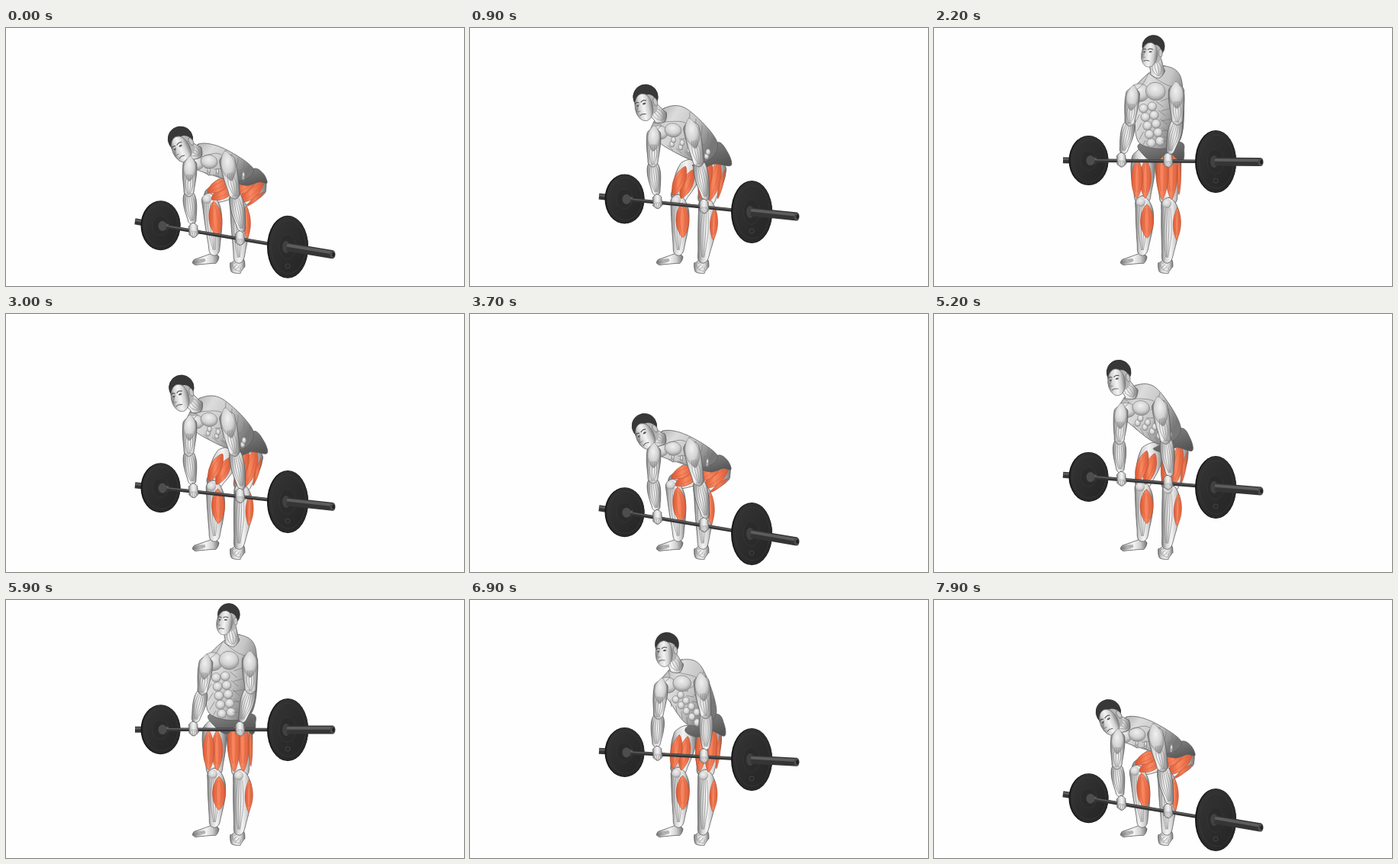
These frames come from a looping animation (600x338 px, 8000 ms). An HTML page:

```html
<!DOCTYPE html>
<html lang="en">
<head>
<meta charset="utf-8">
<title>Barbell deadlift</title>
<style>
  html, body { margin: 0; width: 100%; height: 100%; overflow: hidden; background: #fefefe; }
  svg { display: block; width: 100vw; height: 100vh; }
  path { stroke-linecap: round; stroke-linejoin: round; }
</style>
</head>
<body>
<svg viewBox="0 0 600 338">
  <defs>
    <linearGradient id="skin">
      <stop offset="0" stop-color="#7d7d7d"/><stop offset=".25" stop-color="#d6d6d6"/>
      <stop offset=".5" stop-color="#f4f4f4"/><stop offset=".75" stop-color="#cfcfcf"/>
      <stop offset="1" stop-color="#767676"/>
    </linearGradient>
    <linearGradient id="torso" x2="1" y2=".5">
      <stop offset="0" stop-color="#999"/><stop offset=".35" stop-color="#dcdcdc"/>
      <stop offset=".65" stop-color="#c6c6c6"/><stop offset="1" stop-color="#777"/>
    </linearGradient>
    <radialGradient id="bulge" cx=".45" cy=".35" r=".65">
      <stop offset="0" stop-color="#f0f0f0"/><stop offset=".6" stop-color="#d2d2d2"/>
      <stop offset="1" stop-color="#969696"/>
    </radialGradient>
    <linearGradient id="active">
      <stop offset="0" stop-color="#d9532f"/><stop offset=".45" stop-color="#fa8860"/>
      <stop offset="1" stop-color="#dc5a36"/>
    </linearGradient>
    <linearGradient id="shorts" x2=".6" y2="1">
      <stop offset="0" stop-color="#8a8a8a"/><stop offset="1" stop-color="#555"/>
    </linearGradient>
    <linearGradient id="plate" x2="1" y2="1">
      <stop offset="0" stop-color="#353536"/><stop offset="1" stop-color="#242425"/>
    </linearGradient>
  </defs>
  <g id="scene"></g>
</svg>
<script>
const scene = document.getElementById('scene');
const LOOP = 8000, REP = 4200, STEP = 100;
const MID_Y = 241, LOW_DROP = 48, STAND_RISE = 70;

// Height of the near plate through one repetition: [ms, y]
const LIFT = [[-250, 293], [300, 275], [900, 241], [1200, 195], [1700, 170],
  [1950, 169], [2200, 175], [2700, 209], [3000, 246], [3700, 288]];

// Bent-over and upright position of each joint; the squat is added by rule
const JOINTS = {
  head: [[231, 97], [290, 26]],
  neck: [[251, 118], [296, 56]],
  back: [[284, 106], [327, 67]],
  loin: [[324, 150], [321, 149]],
  seat: [[342, 180], [323, 176]],
  belly: [[304, 176], [268, 150]],
  ribs: [[258, 157], [263, 101]],
  farShoulder: [[241, 136], [262, 80]],
  shoulder: [[289, 128], [319, 76]],
  farHip: [[291, 180], [273, 165]],
  hip: [[321, 178], [306, 162]],
  farKnee: [[272, 224], [273, 226]],
  knee: [[309, 228], [307, 228]]
};

const lerp = (a, b, k) => a + (b - a) * k;
const mix = (a, b, k) => [lerp(a[0], b[0], k), lerp(a[1], b[1], k)];
const shift = (p, dx, dy) => [p[0] + dx, p[1] + dy];
const steps = (count, fn) => Array.from({ length: count + 1 }, (_, i) => fn(i / count));
const n = v => v.toFixed(1);

function liftAt(ms) {
  const key = i => {
    const len = LIFT.length, wrap = Math.floor(i / len), [t, y] = LIFT[i - wrap * len];
    return [t + wrap * REP, y];
  };
  const slope = i => (key(i + 1)[1] - key(i - 1)[1]) / (key(i + 1)[0] - key(i - 1)[0]);
  const t = ms % REP;
  let i = 0;
  while (key(i + 1)[0] <= t) i++;
  const [t0, y0] = key(i), [t1, y1] = key(i + 1);
  const h = t1 - t0, k = (t - t0) / h, r = 1 - k;
  return y0 * r * r * (1 + 2 * k) + y1 * k * k * (3 - 2 * k) + h * k * r * (slope(i) * r - slope(i + 1) * k);
}

function poseAt(y) {
  const squat = Math.max(0, (y - MID_Y) / LOW_DROP), rise = Math.max(0, (MID_Y - y) / STAND_RISE);
  const pose = { squat, rise };
  for (const [name, [bent, upright]] of Object.entries(JOINTS)) {
    const isKnee = /knee/i.test(name), isHip = /hip/i.test(name);
    const drop = isKnee ? -2 : 24 + .4 * (180 - bent[1]);
    pose[name] = shift(mix(bent, upright, rise), squat * (isKnee ? -7 : isHip ? 11 : 0), squat * drop);
  }
  return pose;
}

function smooth(pts, closed) {
  const len = pts.length;
  const at = i => pts[closed ? (i + len) % len : Math.max(0, Math.min(len - 1, i))];
  let d = 'M' + pts[0].map(n).join(' ');
  for (let i = 0; i < (closed ? len : len - 1); i++) {
    const p = at(i - 1), a = at(i), b = at(i + 1), q = at(i + 2);
    d += 'C' + [...a.map((v, c) => v + (b[c] - p[c]) / 6), ...b.map((v, c) => v - (q[c] - a[c]) / 6), ...b].map(n).join(' ');
  }
  return d + (closed ? 'Z' : '');
}

// Point at fraction t of the bone a-b, moved sideways by off
function beside(a, b, t, off) {
  const dx = b[0] - a[0], dy = b[1] - a[1], len = Math.hypot(dx, dy);
  return [a[0] + dx * t + dy / len * off, a[1] + dy * t - dx / len * off];
}

const shape = (pts, fill, stroke = '#5c5c5c', width = .8) =>
  `<path d="${smooth(pts, true)}" fill="${fill}" stroke="${stroke}" stroke-width="${width}"/>`;
const curve = (pts, stroke = '#777', width = .7) =>
  `<path d="${smooth(pts, false)}" fill="none" stroke="${stroke}" stroke-width="${width}"/>`;
const ellipse = (x, y, rx, ry, fill, stroke = 'none', turn = 0) =>
  `<ellipse cx="${n(x)}" cy="${n(y)}" rx="${n(rx)}" ry="${n(ry)}" fill="${fill}" stroke="${stroke}" `
  + `stroke-width=".7" transform="rotate(${turn} ${n(x)} ${n(y)})"/>`;

// Tapered limb that swells in its upper part, by a different amount on each side
function limb(a, b, w0, w1, left = 0, right = left) {
  const len = Math.hypot(b[0] - a[0], b[1] - a[1]);
  const side = (sign, swell) => steps(6, t =>
    beside(a, b, t, sign * (lerp(w0, w1, t) + swell * Math.sin(Math.PI * t ** .7))));
  return shape([beside(a, b, -w0 * .7 / len, 0), ...side(-1, left),
    beside(a, b, 1 + w1 * .7 / len, 0), ...side(1, right).reverse()], 'url(#skin)');
}

function fibres(a, b, from, to, width, count, color = '#7a7a7a') {
  return steps(count, u => {
    const off = lerp(-width, width, u);
    return curve([beside(a, b, from, off * .6), beside(a, b, (from + to) / 2, off), beside(a, b, to, off * .3)], color, .6);
  }).join('');
}

function spindle(a, b, from, to, center, half, fill, stroke) {
  const side = sign => steps(5, t => beside(a, b, lerp(from, to, t), center + sign * half * Math.sin(Math.PI * t) ** .7));
  return shape([...side(-1), ...side(1).reverse().slice(1, -1)], fill, stroke, .6);
}

function activeMuscle(a, b, from, to, center, half) {
  const line = off => curve(steps(3, t =>
    beside(a, b, lerp(from, to, .12 + t * .72), center + off * half * Math.sin(Math.PI * (.12 + t * .72)))), '#cf6340', .6);
  return spindle(a, b, from, to, center, half, 'url(#active)', '#b65335') + line(-.45) + line(.4);
}

function leg(hip, knee, ankle, heel, toe, far) {
  const scale = far ? .92 : 1, top = far ? .1 : -.12;
  return limb(heel, toe, 7, far ? 3.5 : 9) + fibres(heel, toe, .5, 1.1, far ? 2 : 7, 3)
    + limb(hip, knee, 14 * scale, 10 * scale, 4) + limb(knee, ankle, 8.5, 6, 1, far ? 7 : 8)
    + fibres(knee, ankle, .1, .95, 5, 3)
    + activeMuscle(hip, knee, top, .95, 4 * scale, 8 * scale)
    + activeMuscle(hip, knee, top, .95, -8 * scale, 8 * scale)
    + (far ? '' : activeMuscle(hip, knee, .1, .85, 14, 2.5))
    + (far ? activeMuscle(knee, ankle, .08, .72, 6, 8.5) : activeMuscle(knee, ankle, .1, .64, 12, 5))
    + ellipse(knee[0] - 2, knee[1] + 2, 6, 6, 'url(#bulge)');
}

// Hands hold the bar; the elbow follows from shoulder and wrist
function arm(shoulder, hand, flare, scale) {
  const wrist = shift(hand, flare < 0 ? -2 : 2, -12);
  const elbow = shift(mix(shoulder, wrist, .5), flare, 2);
  return limb(elbow, wrist, 7 * scale, 4.5, 3) + limb(shoulder, elbow, 9 * scale, 6.5 * scale, 2)
    + spindle(shoulder, elbow, -.2, .6, 0, 9 * scale, 'url(#bulge)', '#858585')
    + fibres(shoulder, elbow, .4, 1, 5, 3) + fibres(elbow, wrist, 0, .95, 6, 4)
    + limb(shift(hand, -1, -7), shift(hand, 0, 4), 5.5, 6)
    + fibres(hand, shift(hand, -1, 8), 0, 1, 4, 3);
}

function headAt([x, y], turn, size) {
  const eye = (cx, w) => ellipse(cx, 1, w, 1, '#555') + curve([[cx - w - 1, -2], [cx, -3], [cx + w + 1, -2]], '#555', 1.1);
  return `<g transform="translate(${n(x)} ${n(y)}) rotate(${n(turn)}) scale(${size.toFixed(3)})">`
    + ellipse(1, -6, 14.5, 14.5, '#383838', '#2b2b2b')
    + ellipse(3, 4, 9, 12, '#b4b4b4') + ellipse(-4.5, 5, 10.5, 16, 'url(#skin)', '#777', 8)
    + ellipse(10, 3, 2.4, 4.8, '#c6c6c6', '#6d6d6d')
    + eye(-11, 1.4) + eye(-3, 2)
    + curve([[-9, 0], [-14, 7], [-10, 8]]) + curve([[-12, 13], [-9, 12], [-5, 13]], '#666', 1) + '</g>';
}

function trunk(p) {
  const nape = beside(p.head, p.neck, .75, 11), throat = beside(p.head, p.neck, .9, -12);
  const chest = (k, dy) => shift(mix(p.farShoulder, p.shoulder, k), 0, dy);
  const sternum = chest(.3, 12), navel = mix(p.belly, p.loin, .4), width = lerp(6, 12, p.rise) - 3 * p.squat;
  const pec = k => ellipse(...chest(k, 2), lerp(11, 13, p.rise), lerp(9, 12, p.rise), 'url(#bulge)', '#808080', 10);
  let out = shape([nape, p.back, p.loin, p.belly, p.ribs, shift(p.farShoulder, -3, 2), throat], 'url(#torso)');
  for (let t = .1; t < .9; t += .2) {
    for (const side of [-1, 1]) {
      out += ellipse(...beside(sternum, navel, t + .08, side * width * .5), width * .5, lerp(4, 6, p.rise), 'url(#bulge)', '#858585');
      out += curve([beside(sternum, navel, t, side * width * 1.1), beside(sternum, navel, t + .14, side * width * 1.7)]);
    }
    const spine = mix(p.back, p.loin, t), flank = mix(p.ribs, p.belly, t + .2);
    out += curve([spine, shift(mix(spine, flank, .2), 2, 3), mix(spine, flank, .45)]);
  }
  return out + pec(.15) + pec(.52)
    + curve([throat, chest(.2, -7), p.farShoulder]) + curve([throat, chest(.7, -8), p.shoulder])
    + limb(p.head, p.neck, 8, 9) + fibres(p.head, p.neck, .5, 1.1, 6, 3);
}

function briefs(p) {
  const crotch = shift(mix(p.farHip, p.hip, .5), 0, lerp(4, 12, p.rise));
  return shape([p.belly, p.loin, beside(p.loin, p.seat, .5, 5), p.seat, p.hip, crotch, p.farHip], 'url(#shorts)');
}

function bar(x0, x1, width, barY) {
  const line = (dy, w, color) => `<path d="M${x0} ${n(barY(x0) + dy)}L${x1} ${n(barY(x1) + dy)}" `
    + `stroke="${color}" stroke-width="${w}" style="stroke-linecap:butt"/>`;
  return line(0, width, '#353536') + line(-width * .2, width * .35, '#5d5d5e');
}

const plate = (x, y, rx, ry) => ellipse(x, y, rx, ry, '#171718') + ellipse(x + 1, y, rx - 1, ry - .5, 'url(#plate)')
  + ellipse(x + 1, y, rx * .83, ry * .85, 'none', '#3b3b3c') + ellipse(x, y, rx * .4, ry * .4, '#2b2b2c', '#3a3a3b');

function draw(ms) {
  const y = liftAt(ms), p = poseAt(y);
  const farY = 224 + 36.5 * p.squat - 53.5 * p.rise;
  const barY = x => farY + (x - 202) * (y - farY) / 167;
  const grip = x => [x, barY(x)];

  scene.innerHTML =
    bar(169, 180, 8, barY) + plate(202.5, farY, 26, 32.5)
    + leg(p.farHip, p.farKnee, [273, 294], [274, 301], [247, 307], true)
    + leg(p.hip, p.knee, [305, 304], [308, 307], [300, 315], false)
    + briefs(p) + trunk(p)
    + headAt(p.head, -18 * (1 - p.rise) - 14 * p.squat, lerp(1.12, 1, p.rise))
    + bar(208, 346, 4.6, barY) + bar(202, 213, 9, barY) + ellipse(...grip(205), 5.5, 6.5, '#4d4d4e')
    + arm(p.farShoulder, grip(246), lerp(-1, 4, p.rise) - 2, .88)
    + arm(p.shoulder, grip(307), lerp(1, 6, p.rise), 1)
    + plate(369, y, 27, 41) + ellipse(367, y, 5, 8, '#414142') + ellipse(369, y + 25, 3, 3, 'none', '#505051')
    + bar(368, 428, 11, barY) + ellipse(...grip(428), 3.5, 5.5, '#4c4c4d') + ellipse(...grip(429), 1.7, 2.8, '#202021');
}

const start = performance.now();
let shown = -1;
function tick() {
  const elapsed = (performance.now() - start) % LOOP;
  const ms = Math.floor(elapsed / STEP) * STEP;
  if (ms !== shown) draw(shown = ms);
  requestAnimationFrame(tick);
}
tick();
</script>
</body>
</html>
```
